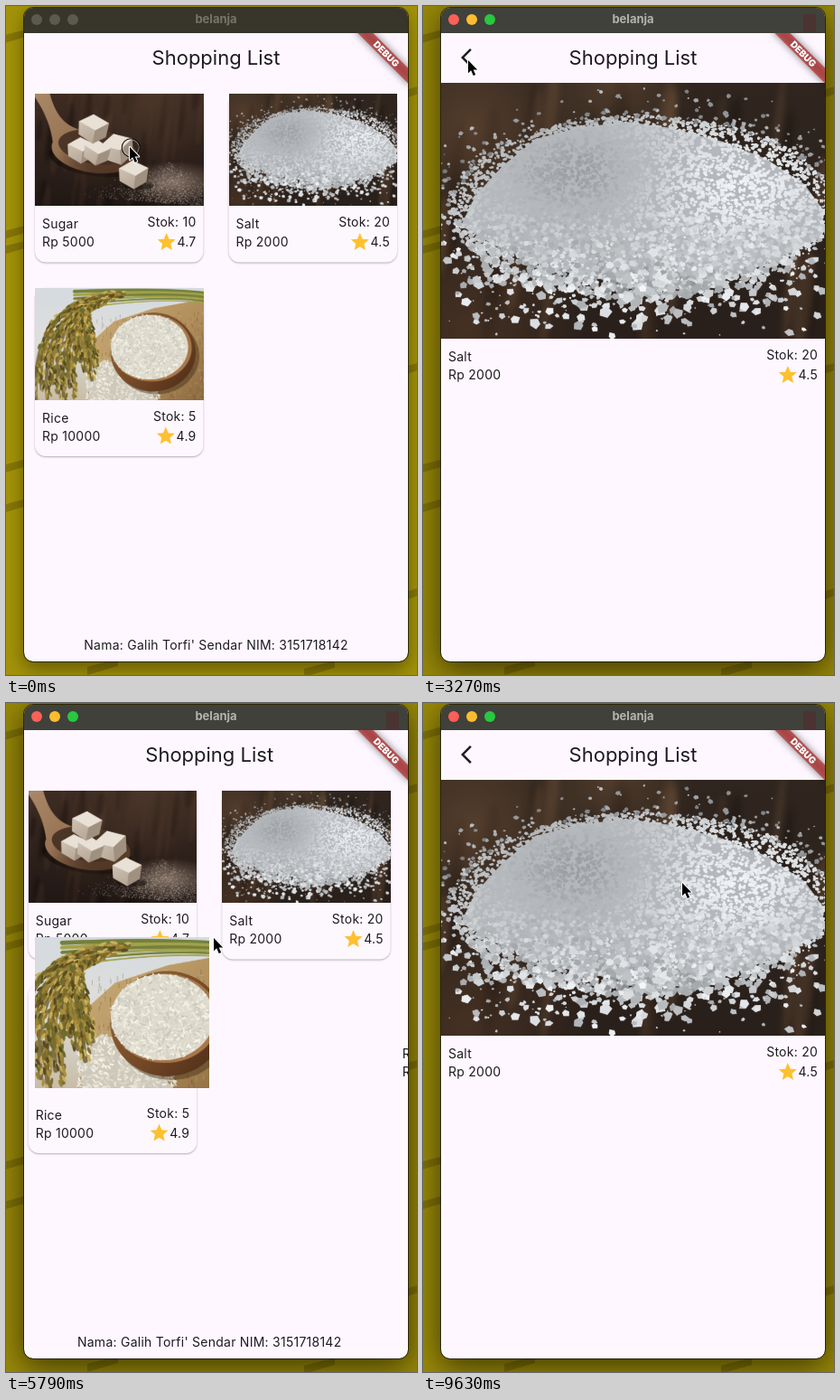
Recreate the animation shown at these times as an HTML page with a canvas. Size 455x740 px, loop 9.78 s.

```html
<!DOCTYPE html>
<html lang="id">
<head>
<meta charset="utf-8">
<title>Shopping List</title>
<style>
html, body { margin: 0; width: 100%; height: 100%; overflow: hidden; background: #8d7e08; }
canvas { display: block; width: 455px; height: 740px; }
</style>
</head>
<body>
<canvas id="stage"></canvas>
<script>
const W = 455, H = 740, LOOP = 9780, FLIGHT = 500;
const WIN = { x: 20, y: 2, w: 425, h: 723 }, BAR = 28;
const INK = '#1d1b20', PAGE = '#fef7ff', FONT = 'Inter, sans-serif';
const canvas = document.getElementById('stage');
const ctx = canvas.getContext('2d');
const ratio = window.devicePixelRatio || 1;
canvas.width = W * ratio;
canvas.height = H * ratio;

// ---------- helpers ----------
function random(seed) {
  return () => {
    seed = (seed * 1664525 + 1013904223) % 4294967296;
    return seed / 4294967296;
  };
}
const mix = (a, b, k) => a + (b - a) * k;
const bez = (a, b, s) => 3 * s * (1 - s) * (1 - s) * a + 3 * s * s * (1 - s) * b + s * s * s;
function cubic(x1, y1, x2, y2) {
  return t => {
    let lo = 0, hi = 1;
    for (let i = 0; i < 24; i++) {
      const s = (lo + hi) / 2;
      if (bez(x1, x2, s) < t) lo = s; else hi = s;
    }
    return bez(y1, y2, lo);
  };
}
function poly(c, points, fill) {
  c.beginPath();
  points.forEach(([x, y]) => c.lineTo(x, y));
  c.closePath();
  c.fillStyle = fill;
  c.fill();
}
function oval(c, x, y, rx, ry, rot, fill) {
  c.beginPath();
  c.ellipse(x, y, rx, ry, rot, 0, Math.PI * 2);
  c.fillStyle = fill;
  c.fill();
}
function gradient(c, x0, y0, x1, y1, ...colors) {
  const g = c.createLinearGradient(x0, y0, x1, y1);
  colors.forEach((col, i) => g.addColorStop(i / (colors.length - 1), col));
  return g;
}
function glow(c, x, y, r, rgb, alpha) {
  const g = c.createRadialGradient(x, y, 0, x, y, r);
  g.addColorStop(0, `rgba(${rgb},${alpha})`);
  g.addColorStop(1, `rgba(${rgb},0)`);
  c.fillStyle = g;
  c.fillRect(x - r, y - r, 2 * r, 2 * r);
}

// ---------- pictures, drawn in 425 x 283 units ----------
function picture(draw, seed) {
  const cv = document.createElement('canvas');
  cv.width = 850;
  cv.height = 566;
  const c = cv.getContext('2d');
  c.scale(2, 2);
  draw(c, random(seed));
  return cv;
}
function planks(c, rnd, top, bottom, light) {
  c.fillStyle = gradient(c, 0, 0, 0, 283, top, bottom);
  c.fillRect(0, 0, 425, 283);
  c.filter = 'blur(7px)';
  for (let i = 0; i < 46; i++)
    oval(c, rnd() * 425, rnd() * 283, 3 + rnd() * 7, 25 + rnd() * 45, .12, i % 2 ? 'rgba(12,9,8,.3)' : light);
  c.filter = 'none';
}
function crystal(c, rnd, x, y, size, v) {
  const turn = rnd() * 6, pts = [];
  for (let i = 0; i < 5; i++) {
    const a = turn + i * 1.257, r = size * (.65 + rnd() * .5);
    pts.push([x + Math.cos(a) * r, y + Math.sin(a) * r * .85]);
  }
  poly(c, pts, `rgb(${v},${v + 3},${v + 6})`);
}
function salt(c, rnd) {
  planks(c, rnd, '#30261f', '#2a201b', 'rgba(124,90,62,.32)');
  glow(c, 35, 50, 120, '130,92,62', .45);
  glow(c, 190, 0, 90, '120,88,60', .45);
  glow(c, 30, 270, 130, '110,74,48', .4);
  const mound = [[22, 158], [38, 125], [68, 92], [105, 62], [150, 50], [205, 43], [255, 50], [312, 65], [360, 84],
    [402, 112], [424, 142], [420, 172], [350, 204], [280, 230], [200, 222], [120, 205], [60, 180]];
  poly(c, mound, '#b4b8bd');
  // Brightness across the heap: dull in the middle left, bright at right.
  const shade = (x, y) => {
    const dull = Math.exp(-((x - 155) ** 2) / 7000 - ((y - 100) ** 2) / 2600);
    const bright = Math.exp(-((x - 325) ** 2) / 12000 - ((y - 115) ** 2) / 4500);
    return 197 - dull * 42 + bright * 42;
  };
  for (let i = 0; i < 5200; i++) {
    const a = rnd() * Math.PI * 2, low = Math.max(0, Math.sin(a)), r = 1.06 * Math.sqrt(rnd());
    const x = 222 + Math.cos(a) * 200 * r, y = 136 + Math.sin(a) * 94 * r;
    const rough = (6 + 48 * low * r) * (x > 300 ? .75 : 1);
    const v = Math.min(247, shade(x, y) + (rnd() - .55) * 2 * rough);
    crystal(c, rnd, x, y, 1.5 + rnd() * (1.8 + 3.6 * low * r), v);
  }
  for (let i = 0; i < 620; i++) {
    const a = rnd() * Math.PI * 2, low = Math.max(0, Math.sin(a)), r = 1 + rnd() * rnd() * .5;
    const x = 222 + Math.cos(a) * 205 * r, y = 138 + Math.sin(a) * 98 * r;
    crystal(c, rnd, x, y, 1 + rnd() * (2.6 + 4 * low), mix(low > 0 ? 165 : 120, low > 0 ? 240 : 185, rnd()));
  }
  for (let i = 0; i < 130; i++) {
    const k = rnd();
    crystal(c, rnd, rnd() * 425, 180 + rnd() * 100, 1 + k * k * 6.5, 170 + rnd() * 70);
  }
}
function cube(c, x, y, s, rot) {
  c.save();
  c.translate(x, y);
  c.rotate(rot);
  poly(c, [[-s, -s * .35], [-s * .1, -s * .95], [s, -s * .5], [s * .15, s * .1]], '#e9e1d5');
  poly(c, [[-s, -s * .35], [s * .15, s * .1], [s * .1, s], [-s * .9, s * .5]],
    gradient(c, -s, -s, s * .2, s, '#d8ccbd', '#b5a695'));
  poly(c, [[s * .15, s * .1], [s, -s * .5], [s * .92, s * .45], [s * .1, s]], '#a09080');
  c.restore();
}
function sugar(c, rnd) {
  planks(c, rnd, '#3f2d23', '#211815', 'rgba(92,66,50,.22)');
  glow(c, 290, 20, 170, '84,62,47', .55);
  const wood = gradient(c, 10, 0, 190, 200, '#a98867', '#987555', '#5a3c28');
  oval(c, 150, 165, 115, 42, .14, 'rgba(12,8,6,.5)');
  c.beginPath();
  c.moveTo(0, 8);
  c.lineTo(0, 0);
  c.lineTo(38, 0);
  c.bezierCurveTo(52, 50, 72, 80, 118, 92);
  c.lineTo(48, 150);
  c.bezierCurveTo(46, 92, 28, 50, 0, 8);
  c.fillStyle = wood;
  c.fill();
  oval(c, 150, 145, 108, 54, .14, wood);
  oval(c, 155, 134, 96, 43, .14, '#4c3627');
  glow(c, 150, 165, 90, '60,40,28', .6);
  cube(c, 116, 142, 34, .08);
  cube(c, 208, 139, 41, -.14);
  cube(c, 156, 148, 33, .2);
  cube(c, 147, 88, 38, .14);
  c.save();
  c.translate(350, 222);
  c.scale(1, .42);
  glow(c, 0, 0, 125, '160,140,124', .75);
  c.restore();
  for (let i = 0; i < 1900; i++) {
    const k = Math.sqrt(rnd()), spread = rnd() + rnd() + rnd() - 1.5;
    const x = 340 + spread * 190 * k, y = 170 + 105 * k + (x - 340) * .08;
    const v = 95 + rnd() * 125;
    c.fillStyle = `rgba(${v},${v - 12},${v - 22},.6)`;
    c.fillRect(x, y, 1.8, 1.8);
  }
  oval(c, 262, 232, 38, 9, 0, 'rgba(20,14,11,.5)');
  cube(c, 248, 203, 37, .06);
}
function riceGrain(c, rnd, x, y) {
  const v = 198 + rnd() * 52;
  oval(c, x, y, 4.6, 1.6, rnd() * 3.14, `rgb(${v},${v - 3},${v - 15})`);
}
function rice(c, rnd) {
  c.fillStyle = gradient(c, 0, 0, 0, 283, '#d6dbe0', '#dfdedb', '#c8bda6');
  c.fillRect(0, 0, 425, 283);
  poly(c, [[150, 130], [200, 85], [300, 52], [390, 36], [425, 26], [425, 283], [130, 283]],
    gradient(c, 200, 80, 425, 283, '#c2a471', '#b18e5b', '#8c6a40'));
  for (let i = 0; i < 420; i++) {
    c.fillStyle = i % 2 ? 'rgba(85,58,28,.25)' : 'rgba(222,196,146,.25)';
    c.fillRect(150 + rnd() * 275, 60 + rnd() * 223, i % 4 ? 2 : 10, i % 4 ? 9 : 2);
  }
  poly(c, [[140, 283], [128, 220], [175, 180], [270, 245], [310, 283]], '#cfc8b8');
  for (let i = 0; i < 620; i++) riceGrain(c, rnd, 130 + rnd() * 185, 185 + rnd() * 98);
  c.lineCap = 'round';
  for (let i = 0; i < 6; i++) {
    c.beginPath();
    c.moveTo(425, 14 + i * 5);
    c.quadraticCurveTo(310, 2 + i * 4, 100, 10 + i * 9);
    c.lineWidth = 8 - i;
    c.strokeStyle = i % 2 ? '#a3a24c' : '#74803a';
    c.stroke();
  }
  oval(c, 306, 172, 108, 96, 0, 'rgba(50,30,12,.4)');
  oval(c, 298, 162, 107, 99, 0, gradient(c, 200, 80, 400, 260, '#96663b', '#754a28', '#4b2b16'));
  oval(c, 294, 152, 101, 84, 0, '#a8774a');
  oval(c, 289, 150, 97, 81, 0, '#dedacd');
  for (let i = 0; i < 1100; i++) {
    const a = rnd() * 6.283, r = Math.sqrt(rnd());
    riceGrain(c, rnd, 288 + Math.cos(a) * 95 * r, 149 + Math.sin(a) * 80 * r);
  }
  const shades = ['#a88f3e', '#806b2a', '#c9b05e', '#574a1e', '#977f35', '#6c6a2c'];
  for (let ear = 0; ear < 12; ear++) {
    const x0 = 225 - ear * 9, y0 = 14 + ear * 4, x2 = 4 + ear * 14;
    const y2 = 292 - (ear * 37) % 60 - (ear > 7 ? 50 : 0), cx = ear * 14 - 16, cy = 22 + ear * 7;
    c.beginPath();
    c.moveTo(x0, y0);
    c.quadraticCurveTo(cx, cy, x2, y2);
    c.lineWidth = 9;
    c.strokeStyle = 'rgba(98,82,32,.75)';
    c.stroke();
    for (let i = 0; i < 90; i++) {
      const k = i / 90, q = 1 - k;
      const x = q * q * x0 + 2 * q * k * cx + k * k * x2, y = q * q * y0 + 2 * q * k * cy + k * k * y2;
      const dir = Math.atan2(q * (cy - y0) + k * (y2 - cy), q * (cx - x0) + k * (x2 - cx));
      oval(c, x + (rnd() - .5) * 19, y + (rnd() - .5) * 14, 7.5, 2.8, dir + (rnd() - .5) * .9, shades[Math.floor(rnd() * 6)]);
    }
  }
}

const ITEMS = {
  sugar: { name: 'Sugar', price: 5000, stock: 10, rating: '4.7', x: 32, y: 97, art: picture(sugar, 7) },
  salt: { name: 'Salt', price: 2000, stock: 20, rating: '4.5', x: 246.5, y: 97, art: picture(salt, 21) },
  rice: { name: 'Rice', price: 10000, stock: 5, rating: '4.9', x: 32, y: 311.5, art: picture(rice, 5) }
};
const CARD_W = 186.5, CARD_H = 186.5, ART_H = 124.4;
const DETAIL = { l: 20, t: 85, r: 445, b: 368.3 };
const cardRect = it => ({ l: it.x, t: it.y, r: it.x + CARD_W, b: it.y + ART_H });

// ---------- timing ----------
const RUNS = [[150, 150, 1], [600, 1340, 6], [1640, 2230, 5], [2680, 3270, 5], [3720, 4750, 8],
  [4900, 5200, 3], [5650, 6670, 8], [6820, 7710, 7], [8010, 9030, 8], [9180, 9630, 4]];
const TICKS = [0];
for (const [from, to, n] of RUNS)
  for (let i = 0; i < n; i++) TICKS.push(Math.floor((from + (n > 1 ? (to - from) * i / (n - 1) : 0)) / 10) * 10);

const ROUTES = [
  [700, 'push', 'sugar'], [1560, 'pop', 'sugar'], [2720, 'push', 'salt'], [3580, 'pop', 'salt'],
  [4560, 'push', 'rice'], [5504, 'pop', 'rice'], [6877, 'push', 'sugar'], [7855, 'pop', 'sugar'], [9100, 'push', 'salt']
];
const POINTER = [
  [0, 137, 156], [890, 137, 156], [1340, 50, 60], [1600, 50, 60], [2230, 305, 185], [2830, 305, 185],
  [3270, 50, 60], [3600, 50, 60], [4450, 155, 344], [4750, 155, 344], [5200, 50, 60], [5510, 50, 60],
  [5790, 230, 260], [6240, 205, 232], [6820, 142, 184], [7110, 142, 184], [7700, 50, 60], [7860, 50, 60],
  [8300, 148, 215], [8880, 287, 203], [9030, 287, 199]
];
const PRESSES = [[0, 150], [600, 760], [2680, 2760], [4440, 4610], [6820, 7000], [9030, 9170]];

const ease = cubic(.4, 0, .2, 1);
const parallax = cubic(.35, .91, .33, .97);
const slideIn = cubic(.2828, .0444, .5455, .5702);
const slideOut = cubic(.2089, 1, .4345, .976);
const slide = t => t < .198 ? .541 * slideIn(t / .198) : .541 + .459 * slideOut((t - .198) / .802);

function pointerAt(t) {
  let i = POINTER.length - 1;
  while (POINTER[i][0] > t) i--;
  const a = POINTER[i], b = POINTER[i + 1] || a;
  const k = b === a ? 0 : (t - a[0]) / (b[0] - a[0]);
  return [mix(a[1], b[1], k), mix(a[2], b[2], k)];
}

// Point on a circular arc that leaves along one axis.
function arcPoint([x0, y0], [x1, y1], k) {
  const dx = x1 - x0, dy = y1 - y0, ax = Math.abs(dx), ay = Math.abs(dy), d = Math.hypot(dx, dy);
  if (ax <= 2 || ay <= 2) return [mix(x0, x1, k), mix(y0, y1, k)];
  const vertical = ax < ay;
  const radius = d * d / (vertical ? ax : ay) / 2;
  const sweep = 2 * Math.asin(d / (2 * radius));
  if (vertical) {
    const a = sweep * (1 - k);
    return [x1 - Math.sign(dx) * radius * (1 - Math.cos(a)), y1 - Math.sign(dy) * radius * Math.sin(a)];
  }
  const a = sweep * k;
  return [x0 + Math.sign(dx) * radius * Math.sin(a), y0 + Math.sign(dy) * radius * (1 - Math.cos(a))];
}
function arcRect(a, b, k) {
  const vx = b.l + b.r - a.l - a.r, vy = b.t + b.b - a.t - a.b;
  const [p, q, u, v] = vx * vy >= 0 ? ['l', 't', 'r', 'b'] : ['r', 't', 'l', 'b'];
  const m = arcPoint([a[p], a[q]], [b[p], b[q]], k), n = arcPoint([a[u], a[v]], [b[u], b[v]], k);
  return { l: Math.min(m[0], n[0]), r: Math.max(m[0], n[0]), t: m[1], b: n[1] };
}

// ---------- drawing ----------
function text(str, x, y, { size = 14, weight = 400, align = 'left', color = INK, spacing = .25 } = {}) {
  ctx.font = `${weight} ${size}px ${FONT}`;
  ctx.letterSpacing = spacing + 'px';
  ctx.textAlign = align;
  ctx.fillStyle = color;
  ctx.fillText(str, x, y);
  return ctx.measureText(str).width;
}
function drawArt(art, { l, t, r, b }) {
  const w = r - l, h = b - t, k = Math.min(art.width / w, art.height / h);
  ctx.drawImage(art, (art.width - w * k) / 2, (art.height - h * k) / 2, w * k, h * k, l, t, w, h);
}
const STAR = new Path2D('M12 17.27 18.18 21l-1.64-7.03L22 9.24l-7.19-.61L12 2 9.19 8.63 2 9.24l5.46 4.73L5.82 21z');
const BACK = new Path2D('M17.77 3.77 16 2 6 12 16 22 17.77 20.23 9.54 12z');
const ARROW = new Path2D('M0 0V14.2L3.2 11.3 5.7 17 8.2 15.9 5.7 10.4H10.2z');
function icon(path, x, y, color) {
  ctx.save();
  ctx.translate(x, y);
  ctx.fillStyle = color;
  ctx.fill(path);
  ctx.restore();
}
function info(it, left, right, bottom) {
  text(it.name, left, bottom + 24.7);
  text('Rp ' + it.price, left, bottom + 44.7);
  text('Stok: ' + it.stock, right, bottom + 23, { align: 'right' });
  const w = text(it.rating, right, bottom + 44.7, { align: 'right' });
  icon(STAR, right - w - 23.7, bottom + 27.7, '#fdc02f');
}
const heading = () => text('Shopping List', 232.5, 65, { size: 22, align: 'center', spacing: 0 });

function listPage(flying) {
  heading();
  for (const it of Object.values(ITEMS)) {
    ctx.save();
    ctx.shadowColor = 'rgba(0,0,0,.3)';
    ctx.shadowBlur = 2 * ratio;
    ctx.shadowOffsetY = ratio;
    ctx.fillStyle = '#fdf7fe';
    ctx.beginPath();
    ctx.roundRect(it.x, it.y, CARD_W, CARD_H, 12);
    ctx.fill();
    ctx.restore();
    if (it !== flying) drawArt(it.art, cardRect(it));
    info(it, it.x + 8, it.x + CARD_W - 8, it.y + ART_H);
  }
  text("Nama: Galih Torfi' Sendar NIM: 3151718142", 232.5, 712, { align: 'center' });
}
function detailPage(it, flying) {
  ctx.fillStyle = PAGE;
  ctx.fillRect(WIN.x, WIN.y + BAR, WIN.w, WIN.h);
  heading();
  icon(BACK, 36, 45, INK);
  if (!flying) drawArt(it.art, DETAIL);
  info(it, 28, 437, DETAIL.b);
}
function shifted(dx, draw) {
  ctx.save();
  ctx.translate(dx, 0);
  draw();
  ctx.restore();
}
function banner() {
  ctx.save();
  ctx.translate(445, 29);
  ctx.rotate(Math.PI / 4);
  ctx.shadowColor = 'rgba(0,0,0,.8)';
  ctx.shadowBlur = 8 * ratio;
  ctx.fillStyle = 'rgba(183,28,28,.63)';
  ctx.fillRect(-42, 28, 84, 12);
  ctx.shadowColor = 'transparent';
  text('DEBUG', 0, 37.6, { size: 10.2, weight: 900, align: 'center', color: '#fff', spacing: 0 });
  ctx.restore();
}
function backdrop(focused) {
  ctx.fillStyle = focused ? '#978708' : '#a39209';
  ctx.fillRect(0, 0, W, H);
  for (const [x, y] of [[-12, 35], [-6, 250], [-10, 268], [-4, 508], [-8, 553], [436, 95], [438, 400], [436, 650], [90, 731], [330, 733]]) {
    const w = x > 400 ? 30 : 34;
    poly(ctx, [[x, y], [x + w, y - 9], [x + w, y - 1], [x, y + 9]], 'rgba(70,60,0,.32)');
  }
}
function windowPath(grow = 0) {
  ctx.beginPath();
  ctx.roundRect(WIN.x - grow, WIN.y - grow, WIN.w + 2 * grow, WIN.h + 2 * grow, 10 + grow);
}
function titleBar(focused) {
  ctx.fillStyle = focused ? '#40413a' : '#38362a';
  ctx.fillRect(WIN.x, WIN.y, WIN.w, BAR);
  if (focused) {
    ctx.fillStyle = 'rgba(92,28,30,.35)';
    ctx.fillRect(421, 9, 14, 20);
  }
  const lights = focused ? ['#fe5f57', '#febc2e', '#28c840'] : ['#5c5a50', '#5c5a50', '#5c5a50'];
  lights.forEach((col, i) => oval(ctx, 34 + i * 20, 15, 6, 6, 0, col));
  text('belanja', 232.5, 19, { size: 13, weight: 700, align: 'center', color: focused ? '#b4b4ad' : '#77756a', spacing: 0 });
}
function pointer(t) {
  const [x, y] = pointerAt(t);
  if (PRESSES.some(([a, b]) => t >= a && t < b)) {
    for (const [r, col] of [[9.1, 'rgba(255,255,255,.45)'], [10, '#111']]) {
      ctx.beginPath();
      ctx.arc(x + 1.3, y + .8, r, 0, Math.PI * 2);
      ctx.lineWidth = 1.1;
      ctx.strokeStyle = col;
      ctx.stroke();
    }
  }
  ctx.save();
  ctx.translate(x, y);
  ctx.lineJoin = 'round';
  ctx.lineWidth = 2;
  ctx.strokeStyle = '#fff';
  ctx.stroke(ARROW);
  ctx.fillStyle = '#000';
  ctx.fill(ARROW);
  ctx.restore();
}

function render(t) {
  const focused = t >= 600;
  ctx.setTransform(ratio, 0, 0, ratio, 0, 0);
  ctx.imageSmoothingQuality = 'high';
  backdrop(focused);
  ctx.save();
  ctx.shadowColor = focused ? 'rgba(0,0,0,.6)' : 'rgba(0,0,0,.4)';
  ctx.shadowBlur = (focused ? 32 : 20) * ratio;
  ctx.shadowOffsetY = 8 * ratio;
  ctx.fillStyle = PAGE;
  windowPath();
  ctx.fill();
  ctx.restore();

  ctx.save();
  windowPath();
  ctx.clip();
  titleBar(focused);
  ctx.beginPath();
  ctx.rect(WIN.x, WIN.y + BAR, WIN.w, WIN.h);
  ctx.clip();

  const route = ROUTES.filter(r => r[0] <= t).pop();
  if (!route) {
    listPage();
  } else {
    const [start, kind, id] = route, it = ITEMS[id], push = kind === 'push';
    const p = Math.min(1, (t - start) / FLIGHT), flying = p < 1;
    const shown = push ? slide(p) : 1 - slide(p);
    const behind = push ? parallax(p) : 1 - parallax(p);
    if (flying || !push) shifted(-behind * WIN.w / 3, () => listPage(flying && it));
    if (flying || push) shifted((1 - shown) * WIN.w, () => detailPage(it, flying));
    if (flying) {
      const card = cardRect(it);
      drawArt(it.art, push ? arcRect(card, DETAIL, ease(p)) : arcRect(DETAIL, card, ease(p)));
    }
  }
  banner();
  ctx.restore();

  windowPath(.5);
  ctx.lineWidth = 1;
  ctx.strokeStyle = 'rgba(20,18,0,.75)';
  ctx.stroke();
  pointer(t);
}

const origin = performance.now();
function frame() {
  const t = (performance.now() - origin) % LOOP;
  render(TICKS.filter(tick => tick <= t).pop());
  requestAnimationFrame(frame);
}
frame();
</script>
</body>
</html>
```
